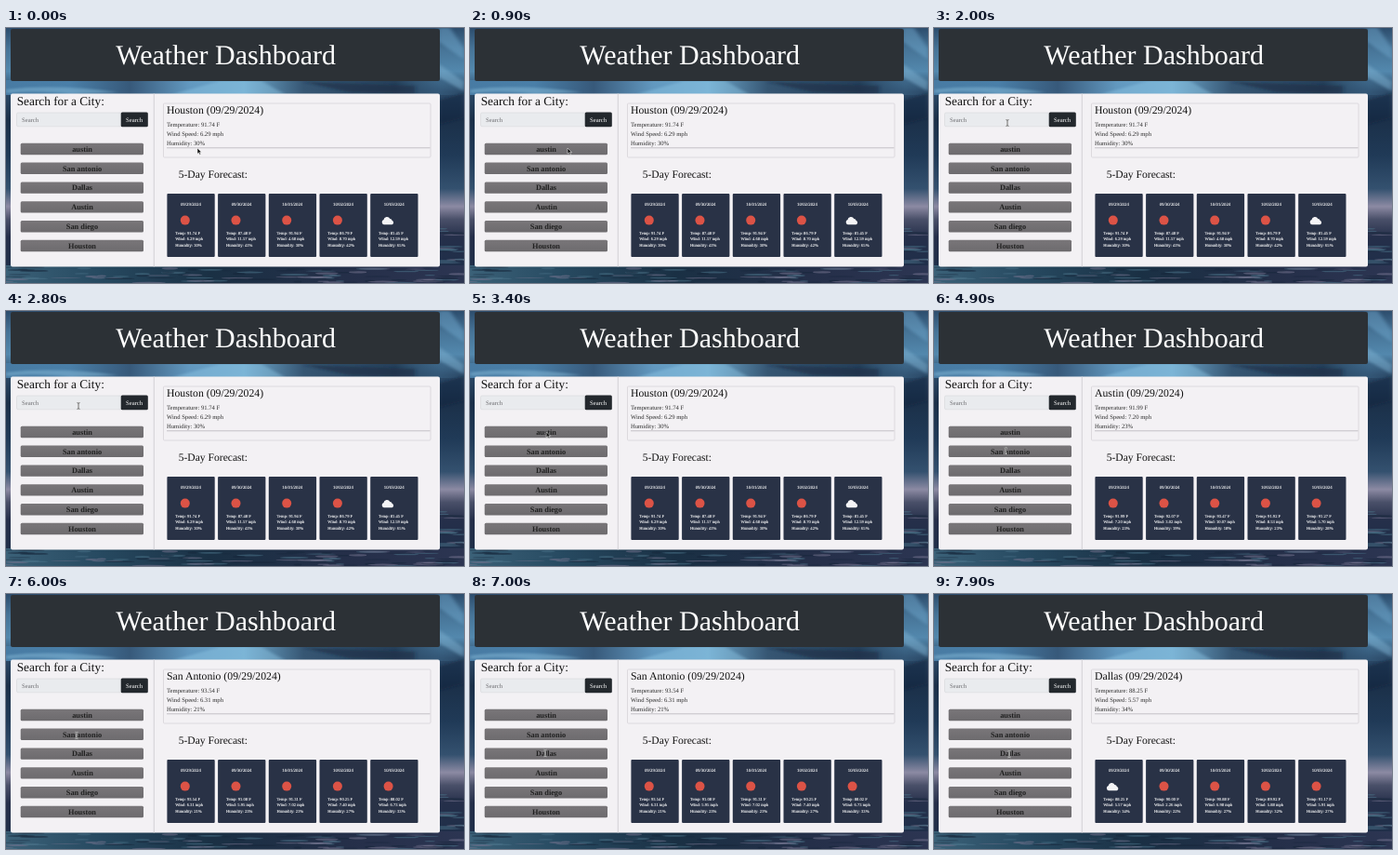
These frames come from a looping animation (493 px wide and 274 px high, 8000 ms). An HTML page:

```html
<!DOCTYPE html>
<html lang="en">
<head>
<meta charset="utf-8">
<title>Weather Dashboard</title>
<style>
html, body { margin: 0; width: 100%; height: 100%; overflow: hidden; background: #24384f; }
svg { display: block; width: 100%; height: 100%; }
text { font-family: "Liberation Serif", "Times New Roman", serif; fill: #111; white-space: pre; text-rendering: geometricPrecision; }
.small { font-size: 6.65px; fill: #2c2c2c; }
.hint { fill: #6c6c70; }
.city { font-size: 8.3px; font-weight: bold; text-anchor: middle; fill: #202020; }
.card text { font-size: 4.6px; fill: #fff; stroke: #fff; stroke-width: .08px; }
.card .date { font-size: 4.8px; text-anchor: middle; }
.white { fill: #fff; }
</style>
</head>
<body>
<svg viewBox="0 0 493 274" preserveAspectRatio="none">
  <defs>
    <linearGradient id="sky" x2="0" y2="1">
      <stop offset="0" stop-color="#2d4d6d"/>
      <stop offset=".08" stop-color="#467396"/>
      <stop offset=".17" stop-color="#5388ad"/>
      <stop offset=".25" stop-color="#2c4a68"/>
      <stop offset=".36" stop-color="#1b3049"/>
      <stop offset=".5" stop-color="#203a57"/>
      <stop offset=".63" stop-color="#34516f"/>
      <stop offset=".7" stop-color="#8c8aa3"/>
      <stop offset=".75" stop-color="#4a5069"/>
      <stop offset=".82" stop-color="#252f4a"/>
      <stop offset="1" stop-color="#1c2f49"/>
    </linearGradient>
    <linearGradient id="band">
      <stop offset="0" stop-color="#487ba3"/>
      <stop offset=".14" stop-color="#4a7fa8"/>
      <stop offset=".27" stop-color="#37597a"/>
      <stop offset=".4" stop-color="#6298bf"/>
      <stop offset=".52" stop-color="#6fa9cd"/>
      <stop offset=".65" stop-color="#365673"/>
      <stop offset=".85" stop-color="#253f59"/>
      <stop offset=".95" stop-color="#3b6486" stop-opacity=".5"/>
      <stop offset="1" stop-color="#3b6486" stop-opacity="0"/>
    </linearGradient>
    <linearGradient id="sea">
      <stop offset="0" stop-color="#3b6178"/>
      <stop offset=".2" stop-color="#274a61"/>
      <stop offset=".45" stop-color="#1a3044"/>
      <stop offset=".75" stop-color="#252f49"/>
      <stop offset="1" stop-color="#2c3552"/>
    </linearGradient>
    <linearGradient id="button" x2="0" y2="1">
      <stop offset="0" stop-color="#797679"/>
      <stop offset="1" stop-color="#6d6b6e"/>
    </linearGradient>
    <filter id="soft" x="-20%" y="-50%" width="140%" height="200%"><feGaussianBlur stdDeviation="2 1"/></filter>
  </defs>

  <rect width="493" height="274" fill="url(#sky)"/>
  <rect y="56" width="493" height="16" fill="url(#band)"/>
  <rect y="255" width="493" height="19" fill="url(#sea)"/>
  <g filter="url(#soft)">
    <path d="M0 66Q55 60 120 69L70 71Q30 66 0 70Z" fill="#86b9d8" opacity=".5"/>
    <path d="M180 71L230 57H275L300 71Z" fill="#8cc3e2" opacity=".45"/>
    <path d="M320 58L440 62V71L370 69Z" fill="#1b3046" opacity=".6"/>
    <path d="M465 0H478L493 22V34L465 14Z" fill="#6aa0c4" opacity=".55"/>
    <path d="M465 38L493 58V68L465 52Z" fill="#7db0d0" opacity=".5"/>
    <path d="M465 78L493 70V96L465 104Z" fill="#182a40" opacity=".6"/>
  </g>
  <g id="waves"></g>

  <rect x="5" y="1" width="462" height="56" rx="2" fill="#2c3136"/>
  <text class="white" x="118.3" y="39.3" font-size="30">Weather Dashboard</text>

  <rect x="5" y="70.5" width="462" height="186" rx="2" fill="#f3f1f4"/>
  <path d="M159.3 70.5V256.5" stroke="#d3d1d5"/>
  <text x="11.7" y="83" font-size="13.3">Search for a City:</text>
  <rect x="11.5" y="91" width="113" height="14.8" rx="1.5" fill="#e9ebee" stroke="#d5d7db" stroke-width=".6"/>
  <text class="small hint" x="17" y="100.6">Search</text>
  <rect x="123.7" y="90.4" width="29.1" height="15.8" rx="1.5" fill="#23282d"/>
  <text class="small white" x="129" y="100.6">Search</text>
  <g id="cities"></g>

  <rect x="169.5" y="81" width="287.5" height="58" rx="1" fill="none" stroke="#d6d4d8" stroke-width=".8"/>
  <path d="M173 128.8H456.5" stroke="#bfbdc1" stroke-width=".9"/>
  <text id="heading" x="173" y="92.3" font-size="11.75"></text>
  <text id="temp" class="small" x="173" y="106"></text>
  <text id="wind" class="small" x="173" y="116"></text>
  <text id="humid" class="small" x="173" y="126"></text>
  <text x="185.7" y="160.8" font-size="11.6">5-Day Forecast:</text>
  <g id="cards"></g>

  <path id="arrow" d="M0 0V6.2L1.5 4.9L2.6 7.2L3.6 6.7L2.6 4.5H4.5Z" fill="#111" stroke="#fff" stroke-width=".5"/>
  <g id="beam" fill="none">
    <path d="M-1.5-3.4Q0-3.4 0-2.5V2.5Q0 3.4-1.5 3.4M1.5-3.4Q0-3.4 0-2.5M0 2.5Q0 3.4 1.5 3.4" stroke="#eee" stroke-width="1.5"/>
    <path d="M-1.5-3.4Q0-3.4 0-2.5V2.5Q0 3.4-1.5 3.4M1.5-3.4Q0-3.4 0-2.5M0 2.5Q0 3.4 1.5 3.4" stroke="#444" stroke-width=".75"/>
  </g>
</svg>
<script>
const LOOP = 8000, STEP = 100;
const DATES = ["09/29/2024", "09/30/2024", "10/01/2024", "10/02/2024", "10/03/2024"];

// Each day: temperature, wind, humidity; "c" marks clouds.
const REPORTS = [
  { from: 0, city: "Houston", days: "91.74 6.29 30,87.48 11.57 41,91.94 4.68 30,86.79 8.70 42,81.45 12.59 65 c" },
  { from: 3600, city: "Austin", days: "91.99 7.20 23,92.07 3.02 19,93.47 10.07 18,91.92 8.53 23,91.27 5.70 28" },
  { from: 5400, city: "San Antonio", days: "93.54 6.31 21,91.08 5.95 23,91.31 7.02 21,90.25 7.40 27,88.02 6.73 33" },
  { from: 7300, city: "Dallas", days: "88.25 5.57 34 c,90.00 2.26 22,90.88 6.98 27,89.92 5.88 32,91.17 5.91 27" }
];

// Pointer path: time, x, y
const PATH = [
  [0, 206, 129], [300, 196, 128], [800, 108, 129], [900, 105, 129], [1100, 103, 128],
  [1700, 80, 103], [2000, 79, 102], [2800, 78, 102], [3300, 82, 129], [3700, 83, 134],
  [4000, 83, 136], [4400, 82, 138], [5000, 77, 151], [6000, 76, 152], [6300, 76, 153],
  [7000, 81, 171], [7900, 81, 172]
];
const BEAM_TIMES = [[1600, 3000], [4900, 6500], [6900, LOOP]];

const $ = id => document.getElementById(id);

let seed = 7;
const random = () => (seed = seed * 16807 % 2147483647) / 2147483647;

// Thin streaks of light and shade on the water
function streak(left, top, width, height) {
  const x = left + random() * width, y = top + random() * height;
  const half = 4 + random() * 14, thick = .4 + random() * .8;
  const tint = ["#16263a", "#4b7288", "#77748f"][Math.floor(random() * 3)];
  return `<ellipse cx="${x}" cy="${y}" rx="${half}" ry="${thick}" fill="${tint}" opacity=".55"/>`;
}
$("waves").innerHTML =
  Array.from({ length: 90 }, () => streak(0, 257, 493, 17)).join("") +
  Array.from({ length: 16 }, () => streak(467, 208, 26, 50)).join("");

$("cities").innerHTML = ["austin", "San antonio", "Dallas", "Austin", "San diego", "Houston"].map((name, i) => {
  const y = 123.8 + i * 20.8;
  return `<rect x="15.7" y="${y}" width="132.3" height="12.4" rx="1.5" fill="url(#button)"/>
    <text class="city" x="82" y="${y + 9}">${name}</text>`;
}).join("");

const sun = '<circle cx="19.4" cy="28.6" r="5" fill="#dc5346"/>';
const cloud = '<path d="M14.6 33.3a2.7 2.7 0 0 1-.3-5.2a3.6 3.6 0 0 1 6.8-1a2.6 2.6 0 0 1 2.4 2a2.2 2.2 0 0 1-.2 4.2z" fill="#f4f4f6"/>';

function card(day, i) {
  const [temp, wind, humid, cloudy] = day.split(" ");
  return `<g class="card" transform="translate(${173.4 + i * 54.7} 178)">
    <rect width="51.3" height="68" rx="1" fill="#293246"/>
    <text class="date" x="25.5" y="13.2">${DATES[i]}</text>${cloudy ? cloud : sun}
    <text x="8.8" y="43.7">Temp: ${temp} F</text>
    <text x="8.8" y="50.3">Wind: ${wind} mph</text>
    <text x="8.8" y="57">Humidity: ${humid}%</text></g>`;
}

let shown;
function showReport(report) {
  if (report === shown) return;
  shown = report;
  const days = report.days.split(",");
  const [temp, wind, humid] = days[0].split(" ");
  $("heading").textContent = `${report.city} (${DATES[0]})`;
  $("temp").textContent = `Temperature: ${temp} F`;
  $("wind").textContent = `Wind Speed: ${wind} mph`;
  $("humid").textContent = `Humidity: ${humid}%`;
  $("cards").innerHTML = days.map(card).join("");
}

function pointerAt(t) {
  const next = PATH.findIndex(p => p[0] > t);
  if (next < 0) return PATH[PATH.length - 1].slice(1);
  const a = PATH[next - 1], b = PATH[next];
  const k = (t - a[0]) / (b[0] - a[0]);
  const ease = k * k * (3 - 2 * k);
  return [a[1] + (b[1] - a[1]) * ease, a[2] + (b[2] - a[2]) * ease];
}

function draw(now) {
  const t = Math.floor((now % LOOP) / STEP) * STEP;
  showReport(REPORTS.filter(r => r.from <= t).pop());
  const place = `translate(${pointerAt(t).join(" ")})`;
  const beam = BEAM_TIMES.some(([a, b]) => t >= a && t < b);
  $("arrow").setAttribute("transform", place);
  $("beam").setAttribute("transform", place);
  $("arrow").style.display = beam ? "none" : "";
  $("beam").style.display = beam ? "" : "none";
}

const start = performance.now();
function tick() {
  draw(performance.now() - start);
  requestAnimationFrame(tick);
}
tick();
</script>
</body>
</html>
```
